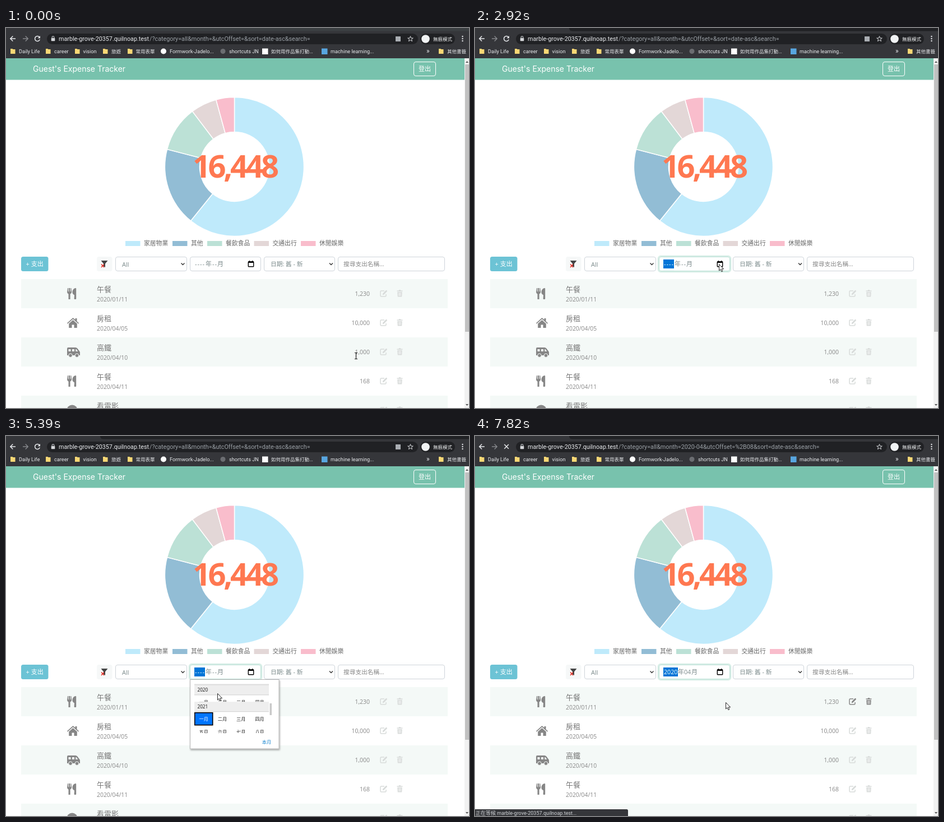
An HTML page that plays this animation: 826x678 px, repeating every 8000 ms.

```html
<!DOCTYPE html>
<html lang="zh-TW">
<head>
<meta charset="utf-8">
<title>Expense Tracker</title>
<style>
html, body { margin: 0; width: 100%; height: 100%; overflow: hidden; background: #fff; }
svg { display: block; width: 100%; height: 100%; }
text { font-family: 'Open Sans', 'Noto Sans CJK TC', 'Noto Sans CJK JP', 'Noto Sans CJK', sans-serif; white-space: pre; }
.ui text, text.ui { font-family: Roboto, 'Noto Sans CJK TC', 'Noto Sans CJK JP', 'Noto Sans CJK', sans-serif; }
#hover { mix-blend-mode: multiply; }
</style>
</head>
<body>
<svg id="stage" viewBox="0 0 826 678" xmlns="http://www.w3.org/2000/svg"></svg>
<script>
const LOOP = 8000;
const HOST = 'marble-grove-20357.quilnoap.test';
const QUERY = '/?category=all&month=&utcOffset=&sort=date-asc&search=';
const QUERY_APRIL = '/?category=all&month=2020-04&utcOffset=%2B08&sort=date-asc&search=';
const MONTHS = '一二三四五六七八九十'.split('').concat('十一', '十二').map(m => m + '月');

const esc = s => s.replace(/&/g, '&amp;');
const rect = (x, y, w, h, fill, extra = '') =>
  `<rect x="${x}" y="${y}" width="${w}" height="${h}" fill="${fill}" ${extra}/>`;
const circle = (x, y, r, fill, extra = '') => `<circle cx="${x}" cy="${y}" r="${r}" fill="${fill}" ${extra}/>`;
const path = (d, fill, extra = '') => `<path d="${d}" fill="${fill}" ${extra}/>`;
const line = (d, color, w = 1.5, extra = '') => path(d, 'none', `stroke="${color}" stroke-width="${w}" ${extra}`);
const group = (x, y, body, extra = '') => `<g transform="translate(${x} ${y})" ${extra}>${body}</g>`;
// Text placed by its vertical centre
const text = (x, cy, s, size, fill, extra = '') =>
  `<text x="${x}" y="${(cy + size * 0.37).toFixed(2)}" font-size="${size}" fill="${fill}" ${extra}>${esc(s)}</text>`;
const mid = 'text-anchor="middle"', end = 'text-anchor="end"';

function browserBar() {
  const folder = x => path(`M${x} 37h3.5l1 1h4v8h-8.5z`, '#f8d775');
  const mark = (x, s) => text(x, 41.5, s, 9.2, '#e8eaed');
  const cjk = (x, s) => text(x, 41.5, s, 8.5, '#e8eaed');
  return `<g class="ui">` +
    rect(0, 0, 826, 54, '#35363a') +
    path('M168 0H826V5.5H174Q168 5.5 168 0Z', '#202124', 'id="strip"') +
    line('M17 19H8M12.3 14.5L7.8 19L12.3 23.5', '#e8eaed') +
    line('M30 19H39M34.7 14.5L39.2 19L34.7 23.5', '#85878b') +
    `<g id="reload">${line('M59.8 16.5A4.5 4.5 0 1 0 60.3 20.5', '#e8eaed')}${path('M61 14V18.3H56.7Z', '#e8eaed')}</g>` +
    `<g id="stop">${line('M52.3 15L60 22.7M60 15L52.3 22.7', '#e8eaed')}</g>` +
    rect(73, 10, 662, 19, '#202124', 'rx="9.5"') +
    rect(80.7, 18, 6.6, 5.2, '#d5d7da', 'rx=".6"') + line('M82.2 18V16.5A1.8 1.8 0 0 1 85.8 16.5V18', '#d5d7da', 1.1) +
    text(94, 19.3, HOST, 10.75, '#e8eaed') +
    text(256, 19.3, QUERY, 10.75, '#9aa0a6', 'id="query"') +
    rect(695, 15, 9, 9, '#a9adb2', 'id="translate"') +
    line('M721.5 14.6L722.8 18H726.3L723.5 20.2L724.6 23.6L721.5 21.6L718.4 23.6L719.5 20.2L716.7 18H720.2Z', '#d5d7da', 1) +
    rect(739, 10, 62, 19, '#202124', 'rx="9.5"') + circle(748.5, 19.5, 7.3, '#f1f3f4') +
    text(762, 19.5, '無痕模式', 8.5, '#f1f3f4') +
    [15, 19, 23].map(y => circle(814.5, y, 1.2, '#e8eaed')).join('') +
    [8, 71, 123, 173, 217, 772].map(folder).join('') +
    mark(23, 'Daily Life') + mark(86, 'career') + mark(137.5, 'vision') + cjk(188, '旅遊') + cjk(231.5, '常用表單') +
    circle(281, 41.5, 5, '#fff') + mark(292, 'Formwork-Jadelo...') +
    circle(387, 41.5, 4.5, '#6b6d71') + mark(398, 'shortcuts JN') +
    rect(457, 36.5, 10.5, 10.5, '#fff') + cjk(473, '如何用作品集打動...') +
    rect(563, 36.5, 10.5, 10.5, '#58a6e0') + mark(579, 'machine learning...') +
    text(750, 40.5, '»', 12, '#e8eaed') + cjk(787, '其他書籤') + '</g>';
}

function pageHeader() {
  return rect(0, 54, 818, 38.5, '#78c2ad') +
    text(48, 73, "Guest's Expense Tracker", 14, '#fff', `style="font-family:Inter,sans-serif"`) +
    rect(727.5, 60.5, 39, 25, 'none', 'rx="3.5" stroke="#fff"') +
    text(747, 73, '登出', 11, '#fff', mid) +
    rect(818, 54, 8, 624, '#f1f1f1') + rect(819, 65, 7, 477, '#c1c1c1') +
    path('M820 62L822.5 59L825 62Z', '#505050') + path('M820 671L822.5 674L825 671Z', '#505050');
}

function donut() {
  const parts = [[10000, '#bfeafb'], [3000, '#92bdd5'], [1748, '#bce1d6'], [1000, '#e3d7d7'], [700, '#f9bdcc']];
  const at = (r, v) => {
    const a = v / 16448 * 2 * Math.PI;
    return `${(407.5 + r * Math.sin(a)).toFixed(2)} ${(247.5 - r * Math.cos(a)).toFixed(2)}`;
  };
  let sum = 0;
  const slices = parts.map(([v, color]) => {
    const a = sum, b = sum += v, big = v > 8224 ? 1 : 0;
    return path(`M${at(124, a)}A124 124 0 ${big} 1 ${at(124, b)}L${at(62, b)}A62 62 0 ${big} 0 ${at(62, a)}Z`,
      color, 'stroke="#fff" stroke-width="1.5"');
  }).join('');
  const names = ['家居物業', '其他', '餐飲食品', '交通出行', '休閒娛樂'];
  const legend = [213, 297, 359, 442.5, 526].map((x, i) =>
    rect(x, 380, 26.5, 9, parts[i][1]) + text(x + 33, 383.5, names[i], 10.8, '#666')).join('');
  return slices + legend +
    `<text x="333" y="267" font-size="56" font-weight="700" letter-spacing="-4.4" fill="#ff7851">16,448</text>`;
}

function filters() {
  const box = (x, w, extra = '') => rect(x, 408.5, w, 25, '#fff', `rx="3.5" stroke="#ced4da" ${extra}`);
  const chevron = x => line(`M${x - 3} 419.5L${x} 422.5L${x + 3} 419.5`, '#333', 1.4);
  return rect(27, 408, 48.5, 26, '#6cc3d5', 'rx="3.5"') + text(51.2, 421, '+ 支出', 11, '#fff', mid) +
    rect(162, 408, 27.5, 26, '#f6f8f8', 'rx="3.5"') +
    path('M169.5 415H181.5L177 420.5V427L174 425V420.5Z', '#444') +
    line('M170 421.5L175 427M175 421.5L170 427', '#e0251b', 1.4) +
    box(195.5, 127) + text(207, 421.5, 'All', 11, '#7b8a8b') + chevron(315.5) +
    rect(327, 407, 129, 28, 'none', 'id="glow" rx="4.5" stroke="#78c2ad" stroke-opacity=".3" stroke-width="2.5"') +
    box(328.5, 126, 'id="month"') +
    rect(336, 413, 19, 16, '#0075d7', 'id="mark"') +
    `<g id="blank">${text(337, 421, '----', 11, '#7b8a8b', 'id="dashes" letter-spacing="1"')}
      ${text(356, 421, '年', 11, '#7b8a8b')}${text(368, 421, '--', 11, '#7b8a8b', 'letter-spacing="1"')}${text(377, 421, '月', 11, '#7b8a8b')}</g>` +
    `<g id="april">${text(337, 421, '2020', 10.7, '#fff')}
      ${text(362, 421, '年', 11, '#7b8a8b')}${text(373, 421, '04', 10.7, '#7b8a8b')}${text(386, 421, '月', 11, '#7b8a8b')}</g>` +
    rect(432.3, 417, 9.4, 8.7, 'none', 'rx=".8" stroke="#000" stroke-width="1.4"') + rect(432, 416.5, 10, 2.5, '#000') +
    line('M434.3 415V417M439.7 415V417', '#000', 1.3) +
    box(460.5, 126) + text(472, 421.5, '日期: 舊 - 新', 10.7, '#7b8a8b') + chevron(580) +
    box(592.5, 190) + text(602, 421.5, '搜尋支出名稱...', 10.7, '#888');
}

const ICONS = {
  meal: path('M.9 0H1.9V6.2H2.9V0H5.2V6.2H6.2V0H7.3L8.1 7Q8.1 9.8 5.6 10.7V20H2.5V10.7Q0 9.8 0 7Z', '#868686') +
    path('M16.2 1V19Q16.2 20 15.2 20H13.6Q12.6 20 12.6 19L13 12.5Q9.4 10.5 9.4 7.5Q9.6 1 15.2 0Q16.2 0 16.2 1Z', '#868686'),
  house: path('M0 9.5L10.5 0L14.5 3.6V1H17.5V6.3L21 9.5L20 10.8L10.5 2.3L1 10.8ZM3.2 10.5L10.5 4L17.8 10.5V18H12.5V12.5H8.5V18H3.2Z', '#868686'),
  van: path('M2 0H15Q17 0 18.2 1.5L22 6.5Q23 7.5 23 9V14H0V2Q0 0 2 0ZM2.5 3V7H6.5V3ZM9 3V7H13V3ZM15.3 3V7H19.4L16.4 3Z', '#868686', 'fill-rule="evenodd"') +
    [6, 17.5].map(x => circle(x, 14.2, 3.3, '#868686', 'stroke="#f4f9f7"')).join(''),
  movie: circle(9, 9, 9.5, '#868686')
};

function expenseList() {
  const tools = group(667, 467,
    line('M8 2H2.5Q1 2 1 3.5V10.5Q1 12 2.5 12H9.5Q11 12 11 10.5V8', 'currentColor') +
    path('M4.8 9.2L5.2 6.8L10.6 1.3Q11.6 .4 12.5 1.4T12.6 3.2L7.2 8.7Z', 'currentColor')) +
    group(697.5, 467, path('M0 1.5H3L3.7 .3H6.3L7 1.5H10V3H0ZM.8 4H9.2L8.7 12.5H1.3Z', 'currentColor') +
    line('M3.3 5.2V11M5 5.2V11M6.7 5.2V11', '#fff', 0.7));
  return [
    ['午餐', '2020/01/11', '1,230', 'meal', 464],
    ['房租', '2020/04/05', '10,000', 'house', 517],
    ['高鐵', '2020/04/10', '1,000', 'van', 570],
    ['午餐', '2020/04/11', '168', 'meal', 620],
    ['看電影', '', '', 'movie', 673]
  ].map(([name, date, sum, icon, y], i) => group(0, i * 52,
    (i % 2 ? '' : rect(27, 448, 761, 52, '#f4f9f7')) +
    group(109, y - i * 52, ICONS[icon]) +
    text(162, 466, name, 13, '#777', 'font-weight="500"') +
    text(162, 484, date, 10.4, '#888') +
    text(649, 474, sum, 10.5, '#888', end) +
    `<g class="tools" color="#d8dbda">${tools}</g>`)).join('');
}

// A year block whose header is centred on y = 0
function year(n, open, picked) {
  const cells = MONTHS.map((m, i) => {
    const x = 352.7 + 33.3 * (i % 4), y = 21.5 + 23 * Math.floor(i / 4), on = picked === i;
    return (on ? rect(x - 16, y - 11, 32, 22, '#0075ff', 'stroke="#000" stroke-width="1.6"') : '') +
      text(x, y, m, 8.2, on ? '#fff' : '#222', mid);
  }).join('');
  return `<g id="y${n}">${open ? rect(336, 9, 133, 72, '#fff') + cells : ''}` +
    rect(336, -9, 133, 18, '#eee') + rect(336, 8.2, 133, 0.8, '#c9c9c9') +
    text(341.5, 0, String(n), 8.2, '#111') + '</g>';
}

function picker() {
  return `<g id="picker">` +
    rect(328.5, 434.5, 158.5, 123.5, '#fff', 'stroke="#b5b5b5" filter="url(#shade)"') +
    `<g clip-path="url(#list)">${year(2020, true)}${year(2019)}${year(2021, true, 0)}` +
    rect(0, 0, 33.3, 23, '#b0d5ff', 'id="hover"') + '</g>' +
    rect(470.5, 477, 3.5, 21, '#c9c9c9') + text(465, 546, '本月', 8.2, '#1a86d0', mid) + '</g>';
}

const $ = id => document.getElementById(id);
$('stage').innerHTML =
  `<defs><clipPath id="list">${rect(336, 442, 133, 88, '#000')}</clipPath>
   <filter id="shade" x="-10%" y="-10%" width="120%" height="125%"><feDropShadow dx="1" dy="2" stdDeviation="1.8" flood-opacity=".35"/></filter></defs>` +
  rect(0, 0, 826, 678, '#fff') + browserBar() + pageHeader() + donut() + filters() + expenseList() + picker() +
  `<g id="status">${path('M0 666H270.5Q273 666 273 668.5V678H0Z', '#35363a')}
   ${text(1, 673, '正在等候 ' + HOST + '...', 9, '#d0d3d7', 'class="ui"')}</g>` +
  `<g id="beam">${line('M-2.5 -5.5H-.8L0 -5L.8 -5.5H2.5M0 -5V5M-2.5 5.5H-.8L0 5L.8 5.5H2.5', '#111', 1.1)}</g>` +
  `<g id="arrow">${path('M.5 .5V12L3.1 9.6L4.9 13.7L6.8 12.9L5 8.9H8.6Z', '#fff', 'stroke="#111" stroke-width=".9"')}</g>`;

// Pointer stops: time, x, y
const STOPS = [
  [0, 624.5, 585], [50, 624.5, 585], [280, 347, 463], [489, 347, 463], [490, 343, 456], [590, 343, 456],
  [1290, 412, 421], [2310, 412, 421], [2460, 391, 421], [2560, 391, 421], [2900, 435, 421],
  [3400, 435, 423], [4080, 382, 460], [4980, 382, 460], [5090, 377, 459], [5860, 377, 459],
  [6000, 443, 476], [7760, 443, 476], [7820, 447, 475], [LOOP, 447, 475]
];
const clamp = v => Math.max(0, Math.min(1, v));
const phase = (t, a, b) => clamp((t - a) / (b - a));
const smooth = p => (1 - Math.cos(Math.PI * p)) / 2;

function pointer(t) {
  const i = STOPS.findIndex(s => s[0] > t);
  const [ta, xa, ya] = STOPS[i - 1], [tb, xb, yb] = STOPS[i];
  const p = smooth(phase(t, ta, tb));
  return [xa + (xb - xa) * p, ya + (yb - ya) * p];
}

const show = (id, on) => $(id).setAttribute('visibility', on ? 'visible' : 'hidden');
const move = (id, x, y) => $(id).setAttribute('transform', `translate(${x.toFixed(2)} ${y.toFixed(2)})`);
const toolSets = [...document.querySelectorAll('.tools')];

function draw(t) {
  const [x, y] = pointer(t);
  const open = t >= 3100 && t < 6240, chosen = t >= 6240, loading = t >= 6450, moved = t >= 6950;
  const focus = phase(t, 1960, 2080);

  show('beam', t < 490);
  show('arrow', t >= 490);
  move('beam', x, y);
  move('arrow', x, y);

  const row = t > 70 && !open ? Math.floor((y - 448) / 52) : -1;
  toolSets.forEach((el, i) => el.setAttribute('color', i === row ? '#868686' : '#d8dbda'));

  // The first click also activates the window
  $('strip').setAttribute('fill', focus > 0 ? '#202124' : '#3c4043');
  $('glow').setAttribute('opacity', focus);
  $('month').setAttribute('stroke', focus > 0.5 ? '#bce1d6' : '#ced4da');
  show('mark', focus > 0.5);
  $('mark').setAttribute('width', chosen ? 26 : 19);
  $('dashes').setAttribute('fill', focus > 0.5 ? '#fff' : '#7b8a8b');
  show('blank', !chosen);
  show('april', chosen);

  const scroll = 22 * (1 - Math.pow(1 - phase(t, 4320, 5090), 7));
  const grow = smooth(phase(t, 5250, 5780));
  const y20 = 432 + scroll - 4 * grow, y21 = y20 + 18 + 72 * grow;
  $('picker').setAttribute('display', open ? 'inline' : 'none');
  move('y2019', 0, y20 - 18);
  move('y2020', 0, y20);
  move('y2021', 0, y21);

  const top = (t < 5250 ? y21 : y20) + 10;
  const col = Math.floor((x - 336) / 33.3), line = Math.floor((y - top) / 23);
  const over = open && col >= 0 && col < 4 && line >= 0 && line < 3;
  $('hover').setAttribute('opacity', over ? 1 : 0);
  move('hover', 336 + col * 33.3, top + line * 23);

  show('reload', !loading);
  show('stop', loading);
  show('status', loading);
  show('translate', !moved);
  $('query').textContent = moved ? QUERY_APRIL : QUERY;
}

function tick() {
  draw(performance.now() % LOOP);
  requestAnimationFrame(tick);
}
tick();
</script>
</body>
</html>
```
